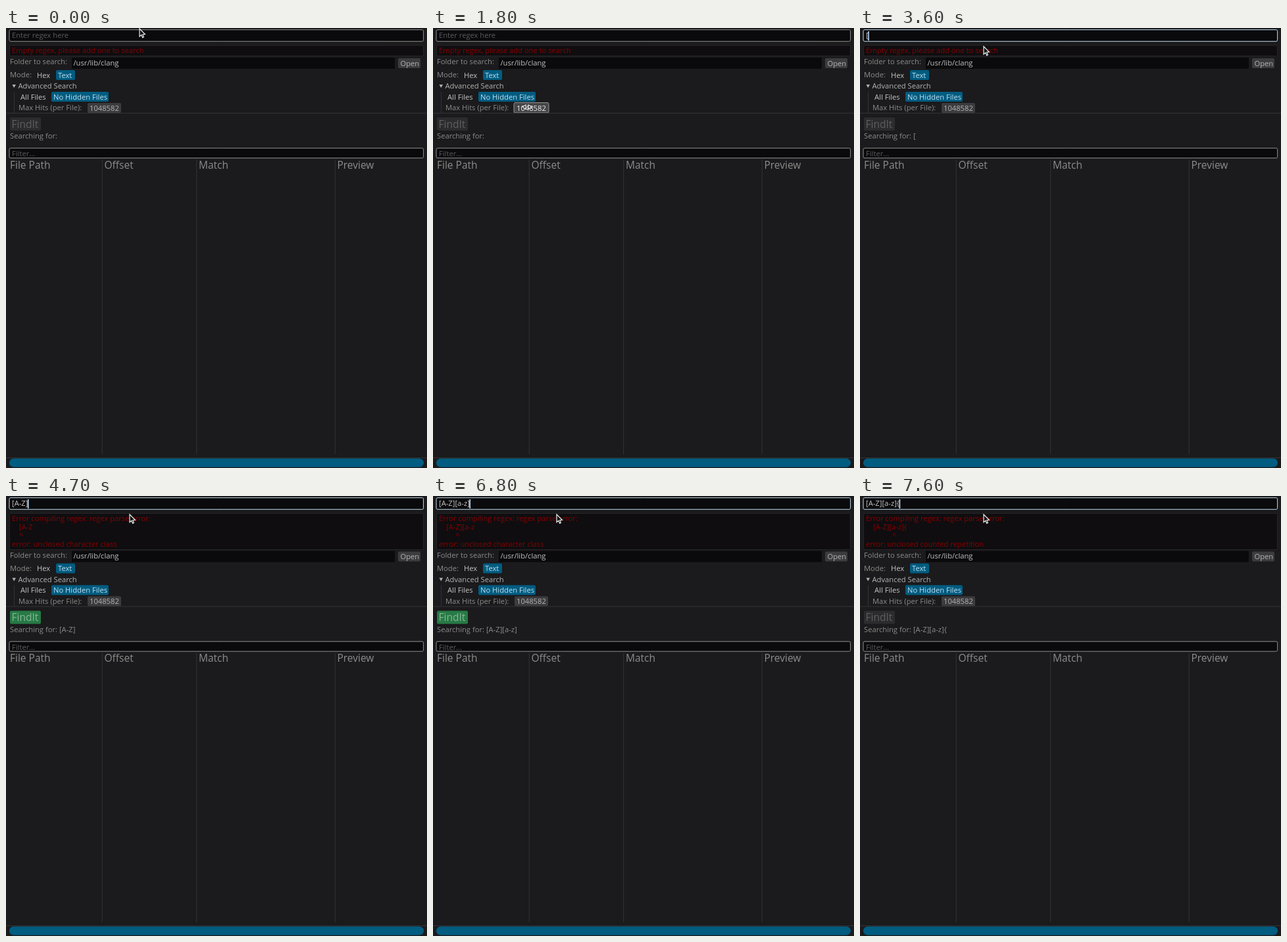
Animation of 640x669 px, one loop 8 s. Source, as an HTML page with a canvas:

```html
<!DOCTYPE html>
<html lang="en">
<head>
<meta charset="utf-8">
<style>
html, body { margin: 0; width: 100%; height: 100%; overflow: hidden; background: #1b1a1c; }
canvas { display: block; }
</style>
</head>
<body>
<canvas id="stage" width="640" height="669"></canvas>
<script>
const ctx = document.getElementById('stage').getContext('2d');
const LOOP = 8000, SMALL = 11.2, LARGE = 15.5;
const FONT = '"Open Sans", "Noto Sans", sans-serif';
const LABEL = '#8c8c8c', STRONG = '#c4c4c4', DIM = '#5c5c5c', RED = '#860004',
  BLUE = '#005c80', FIELD = '#0a090b', LINE = '#343336', EDGE = '#8f8f8f';

// start time, typed regex, regex shown in the error box (null: no box)
const steps = [
  [0, '', ''],
  [3600, '[', ''],
  [3800, '[A', '[A'],
  [4100, '[A-', '[A-'],
  [4300, '[A-Z', '[A-Z'],
  [4600, '[A-Z]', '[A-Z'],
  [4800, '[A-Z]', null],
  [5300, '[A-Z][', '[A-Z]['],
  [5800, '[A-Z][a', '[A-Z][a'],
  [6100, '[A-Z][a-', '[A-Z][a-'],
  [6300, '[A-Z][a-z', '[A-Z][a-z'],
  [6700, '[A-Z][a-z]', '[A-Z][a-z'],
  [6900, '[A-Z][a-z]', null],
  [7400, '[A-Z][a-z]{', '[A-Z][a-z]{']
];

// pointer path: time, x, y
const path = [
  [0, 203, 1], [500, 247, 155], [1300, 247, 155], [1700, 143, 120],
  [2100, 143, 120], [2800, 188, 14], [3100, 188, 28], [LOOP, 188, 28]
];

function text(str, x, y, color = LABEL, size = SMALL) {
  ctx.font = `400 ${size}px ${FONT}`;
  ctx.fillStyle = color;
  ctx.fillText(str, x, y);
}

function box(x, y, w, h, fill, stroke, r = 2) {
  ctx.beginPath();
  ctx.roundRect(x, y, w, h, r);
  ctx.fillStyle = fill;
  ctx.fill();
  if (stroke) {
    ctx.strokeStyle = stroke;
    ctx.lineWidth = 1;
    ctx.stroke();
  }
}

function rect(x, y, w, h, color) {
  ctx.fillStyle = color;
  ctx.fillRect(x, y, w, h);
}

function shape(points, fill, stroke) {
  ctx.beginPath();
  points.forEach(([x, y]) => ctx.lineTo(x, y));
  ctx.closePath();
  ctx.fillStyle = fill;
  ctx.fill();
  if (stroke) {
    ctx.strokeStyle = stroke;
    ctx.lineWidth = 1.2;
    ctx.stroke();
  }
}

function pointerAt(t) {
  const i = path.findIndex(p => p[0] > t);
  const [t0, x0, y0] = path[i - 1], [t1, x1, y1] = path[i];
  const k = (t - t0) / (t1 - t0), e = k * k * (3 - 2 * k);
  return [x0 + (x1 - x0) * e, y0 + (y1 - y0) * e];
}

function drawRegex(typed, focus) {
  box(5, 2.7, 629.6, 17.6, FIELD, focus ? '#c0dcec' : EDGE);
  text(typed || 'Enter regex here', 9, 15, typed ? STRONG : DIM);
  if (focus) {
    const end = typed ? ctx.measureText(typed).width : 0;
    rect(8.5 + end, 5, 1.6, 14, '#c0deff');
  }
}

function drawError(err) {
  box(5.5, 26.5, 629, err ? 55 : 16, '#0f0d0f', '#262427');
  if (!err) {
    text('Empty regex, please add one to search', 9, 38, RED);
    return;
  }
  const col = Math.max(err.lastIndexOf('['), err.lastIndexOf('{'));
  const what = err[col] === '{' ? 'counted repetition' : 'character class';
  text('Error compiling regex: regex parse error:', 9, 38, RED);
  text(err, 20, 51, RED);
  text('^', 20 + 2.9 * col, 64, RED);
  text('error: unclosed ' + what, 9, 77, RED);
}

function drawOptions(hover) {
  text('Folder to search:', 6, 55);
  rect(100, 45, 491, 17, FIELD);
  text('/usr/lib/clang', 102.5, 56.5, STRONG);
  box(596, 46, 34, 15, '#3c3b3d');
  text('Open', 599.5, 57.5, '#b4b4b4');

  text('Mode:', 6, 75);
  text('Hex', 47, 75.5, STRONG);
  box(76, 64, 29, 15, BLUE);
  text('Text', 79, 75.5, '#c0dff0');

  shape([[9.5, 86], [15, 86], [12.2, 91]], '#b0b0b0');
  text('Advanced Search', 18.5, 92, '#b4b4b4');
  rect(12, 97, 1, 32, LINE);
  text('All Files', 22, 108.5, STRONG);
  box(69, 97, 87, 15, BLUE);
  text('No Hidden Files', 72, 108.5, '#c0dff0');

  text('Max Hits (per File):', 19, 125);
  if (hover) box(123, 113.5, 53, 15.5, '#464547', '#959595');
  else box(124, 114, 51, 15, '#3c3b3d');
  text('1048582', 127, 125.5, hover ? '#f0f0f0' : '#b4b4b4');
  rect(0, 129, 640, 1, LINE);
}

function drawResults(typed, valid) {
  box(6, 136, 47, 20, valid ? '#277a45' : '#2c2b2d');
  text('FindIt', 8.5, 151.5, valid ? '#86b596' : '#5e5d5f', LARGE);
  text('Searching for: ' + typed, 6, 168);
  box(5, 182.7, 629.6, 15, FIELD, EDGE);
  text('Filter...', 9, 195, DIM);
  [['File Path', 6], ['Offset', 149.5], ['Match', 293], ['Preview', 503.5]]
    .forEach(([name, x]) => text(name, x, 213.7, LABEL, LARGE));
}

function drawPointer(t) {
  const [x, y] = pointerAt(t);
  if (t >= 1700 && t < 2200) {
    shape([[x - 7, y], [x - 2, y - 3], [x - 2, y + 3]], '#222', '#e8e8e8');
    shape([[x + 7, y], [x + 2, y - 3], [x + 2, y + 3]], '#222', '#e8e8e8');
    return;
  }
  const arrow = [[0, 0], [0, 12], [2.8, 9.6], [4.6, 13.6], [6.4, 12.8], [4.8, 8.9], [8.4, 8.6]];
  shape(arrow.map(([dx, dy]) => [x + dx, y + dy]), '#111', '#eeeeee');
}

function draw(now) {
  const t = now % LOOP;
  const [, typed, err] = steps.findLast(s => s[0] <= t);
  const valid = typed.endsWith(']');
  const shift = err === null ? -19 : err ? 38.5 : 0;

  rect(0, 0, 640, 669, '#1b1a1c');
  drawRegex(typed, t >= 3300);
  if (err !== null) drawError(err);
  [145.7, 289.2, 499.7].forEach(x => rect(x, 200 + shift, 1, 448 - shift, LINE));

  ctx.save();
  ctx.translate(0, shift);
  drawOptions(t >= 1700 && t < 2200);
  drawResults(typed, valid);
  ctx.restore();

  rect(0, 653, 640, 1, LINE);
  box(5, 654.6, 630, 13.2, BLUE, null, 6.6);
  drawPointer(t);
}

const start = performance.now();
function tick() {
  draw(performance.now() - start);
  requestAnimationFrame(tick);
}
tick();
</script>
</body>
</html>
```
